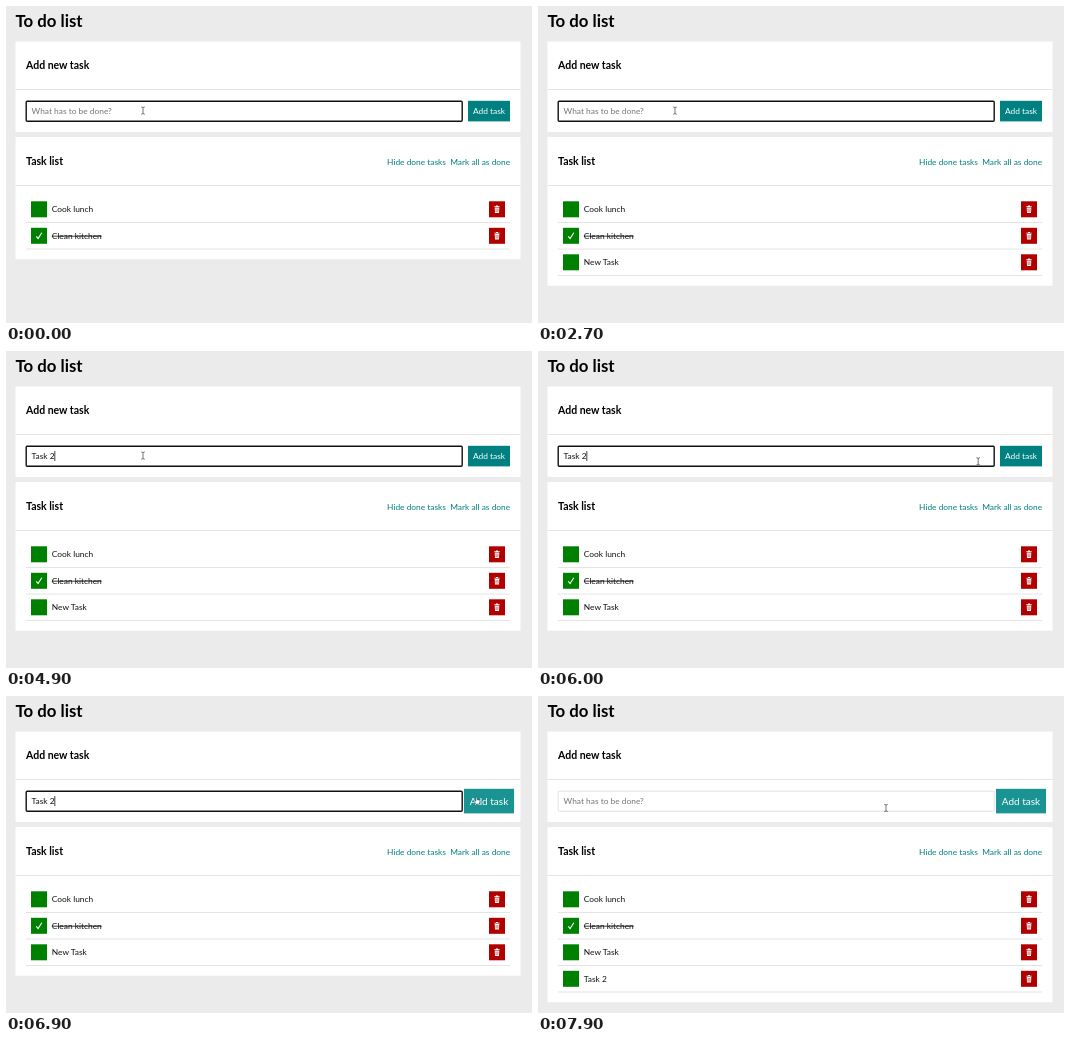
Write an HTML page that moves like this. It is 526x317 px and loops after 8000 ms.

```html
<!DOCTYPE html>
<html lang="en">
<head>
<meta charset="utf-8">
<title>To do list</title>
<style>
  html, body { margin: 0; width: 100%; height: 100%; overflow: hidden; background: #ebebeb; }
  svg { display: block; width: 526px; height: 317px; }
  text { font: 8.4px Lato, sans-serif; white-space: pre; fill: #111; }
  .page-title { font-size: 16.8px; font-weight: 700; fill: #000; }
  .title { font-size: 10.5px; font-weight: 700; fill: #000; }
  .link { fill: #008080; }
  .light { fill: #fff; }
  .done { text-decoration: line-through; }
  .panel { fill: #fff; }
  .rule { stroke: #e4e4e4; stroke-width: 1; }
  .tick { fill: none; stroke: #fff; stroke-width: 1.1; }
</style>
</head>
<body>
<svg viewBox="0 0 526 317">
  <rect width="526" height="317" fill="#ebebeb"/>
  <text class="page-title" x="9.5" y="20.7">To do list</text>

  <rect class="panel" x="9.5" y="35.5" width="505" height="90.5"/>
  <text class="title" x="20" y="63.4">Add new task</text>
  <path class="rule" d="M9.5 83.5H514.5"/>
  <rect id="field" x="20.2" y="95.2" width="436" height="20" rx="1" fill="#fff"/>
  <text id="entry" x="25.5" y="107.9"></text>
  <rect id="caret" y="100" width="0.8" height="10" fill="#111"/>

  <rect id="listPanel" class="panel" x="9.5" y="131" width="505"/>
  <text class="title" x="20" y="159.2">Task list</text>
  <text class="link" x="440" y="158.5" text-anchor="end">Hide done tasks</text>
  <text class="link" x="504.2" y="158.5" text-anchor="end">Mark all as done</text>
  <path class="rule" d="M9.5 179.5H514.5"/>
  <g id="rows"></g>

  <g id="button">
    <rect id="buttonFace" x="-21" y="-10.3" width="42" height="20.6"/>
    <text class="light" y="3" text-anchor="middle">Add task</text>
  </g>

  <g id="cursor">
    <path id="beam" d="M-1.8 -3.6Q0 -3.6 0 -2.6Q0 -3.6 1.8 -3.6M0 -2.8V2.8M-1.8 3.6Q0 3.6 0 2.6Q0 3.6 1.8 3.6"
          fill="none" stroke="#555" stroke-width="0.8"/>
    <path id="arrow" d="M0 0V7.4L1.8 5.8L3 8.4L4.1 7.9L3 5.4H5.3Z" fill="#111" stroke="#fff" stroke-width="0.5"/>
    <path id="hand" d="M-1.2 -3.2Q-0.5 -3.9 0.1 -3.2V-0.9L2.6 -0.4Q3.1 0 2.9 1.2L2.2 3.5H-1.1L-2.8 0.9Q-2.6 0 -1.2 0.7Z"
          fill="#fff" stroke="#234" stroke-width="0.5"/>
  </g>
</svg>
<script>
const LOOP = 8000, TICK = 100;
const HOVER_IN = 6130, BLUR = 7200, CLICK = 7400, HOVER_OUT = 7840;
const TASKS = [
  { name: "Cook lunch", from: 0 },
  { name: "Clean kitchen", from: 0, done: true },
  { name: "New Task", from: 2600 },
  { name: "Task 2", from: CLICK }
];
// Each key press: time and the resulting field text.
const KEYS = [
  [-500, ""], [200, "N"], [700, "New"], [900, "New T"], [1300, "New T"],
  [1700, "New Ta"], [1800, "New Tas"], [1900, "New Task"], [2600, ""],
  [3900, "T"], [4000, "Ta"], [4200, "Tas"], [4400, "Task"],
  [4800, "Task "], [4900, "Task 2"], [CLICK, ""]
];

const $ = id => document.getElementById(id);
const show = (node, on) => node.setAttribute("visibility", on ? "visible" : "hidden");
const clamp = x => Math.min(1, Math.max(0, x));
const mix = (a, b, p) => a + (b - a) * p;
const smooth = p => p * p * (3 - 2 * p);

// The CSS "ease" curve, solved by bisection.
function ease(x) {
  const curve = (a, b, u) => 3 * a * u * (1 - u) ** 2 + 3 * b * u * u * (1 - u) + u ** 3;
  let low = 0, high = 1;
  for (let i = 0; i < 20; i++) {
    const mid = (low + high) / 2;
    if (curve(.25, .25, mid) < x) low = mid; else high = mid;
  }
  return curve(.1, 1, low);
}

$("rows").innerHTML = TASKS.map(({ name, done }, i) => `
  <g transform="translate(0 ${203.3 + 26.5 * i})">
    <rect x="25" y="-8" width="16" height="16" fill="#008000"/>
    ${done ? '<path class="tick" d="M30.3 .6L32.1 2.7L35.8 -3"/>' : ""}
    <text x="45.8" y="3"${done ? ' class="done"' : ""}>${name}</text>
    <rect x="483" y="-8" width="16" height="16" fill="#b00000"/>
    <path class="light" d="M488.3 -3.1H490V-3.8H492V-3.1H493.7V-2.2H488.3ZM488.7 -1.7H493.3L493 3.6H489Z"/>
    <path d="M490.1 -.8V2.7M491.9 -.8V2.7" stroke="#b00000" stroke-width=".6"/>
    <path class="rule" d="M20 13.2H504"/>
  </g>`).join("");
const rows = [...$("rows").children];

function drawList(t) {
  const count = TASKS.filter(task => t >= task.from).length;
  rows.forEach((row, i) => row.setAttribute("display", i < count ? "inline" : "none"));
  $("listPanel").setAttribute("height", 69.2 + 26.5 * count);
}

function drawField(t) {
  const [pressed, value] = KEYS.filter(key => key[0] <= t).pop();
  const entry = $("entry"), focused = t < BLUR;
  entry.textContent = value || "What has to be done?";
  entry.style.fill = value ? "#111" : "#757575";
  const phase = (t - pressed) % 1000;
  const lit = value ? phase < 500 : t >= 3000 && t < 3500;
  $("caret").setAttribute("x", 25.4 + (value ? entry.getComputedTextLength() : 0));
  show($("caret"), focused && lit);
  $("field").setAttribute("stroke", focused ? "#111" : "#e2e2e2");
  $("field").setAttribute("stroke-width", focused ? 1.4 : 1);
}

function drawButton(t) {
  const hover = ease(clamp((t - HOVER_IN) / 1000)) - ease(clamp((t - HOVER_OUT) / 1000));
  $("button").setAttribute("transform", `translate(483 105.1) scale(${1 + .2 * hover})`);
  $("buttonFace").setAttribute("fill", `rgb(${26 * hover} ${mix(128, 149, hover)} ${mix(128, 148, hover)})`);
}

function drawCursor(t) {
  const go = smooth(clamp((t - 5350) / 800));
  const back = clamp((t - 7800) / 100);
  const x = mix(mix(137, 471, go), 348, back);
  const y = 104.6 + 20 * Math.sin(Math.PI * go) + 7.4 * back;
  const overButton = t >= HOVER_IN && t < HOVER_OUT;
  const overField = !overButton && y < 115.5 && x < 457;
  $("cursor").setAttribute("transform", `translate(${x} ${y})`);
  show($("hand"), overButton);
  show($("beam"), overField);
  show($("arrow"), !overButton && !overField);
}

const start = performance.now();
function draw() {
  const elapsed = (performance.now() - start) % LOOP;
  const t = Math.floor(elapsed / TICK) * TICK;
  drawList(t);
  drawField(t);
  drawButton(t);
  drawCursor(t);
  requestAnimationFrame(draw);
}
draw();
</script>
</body>
</html>
```
